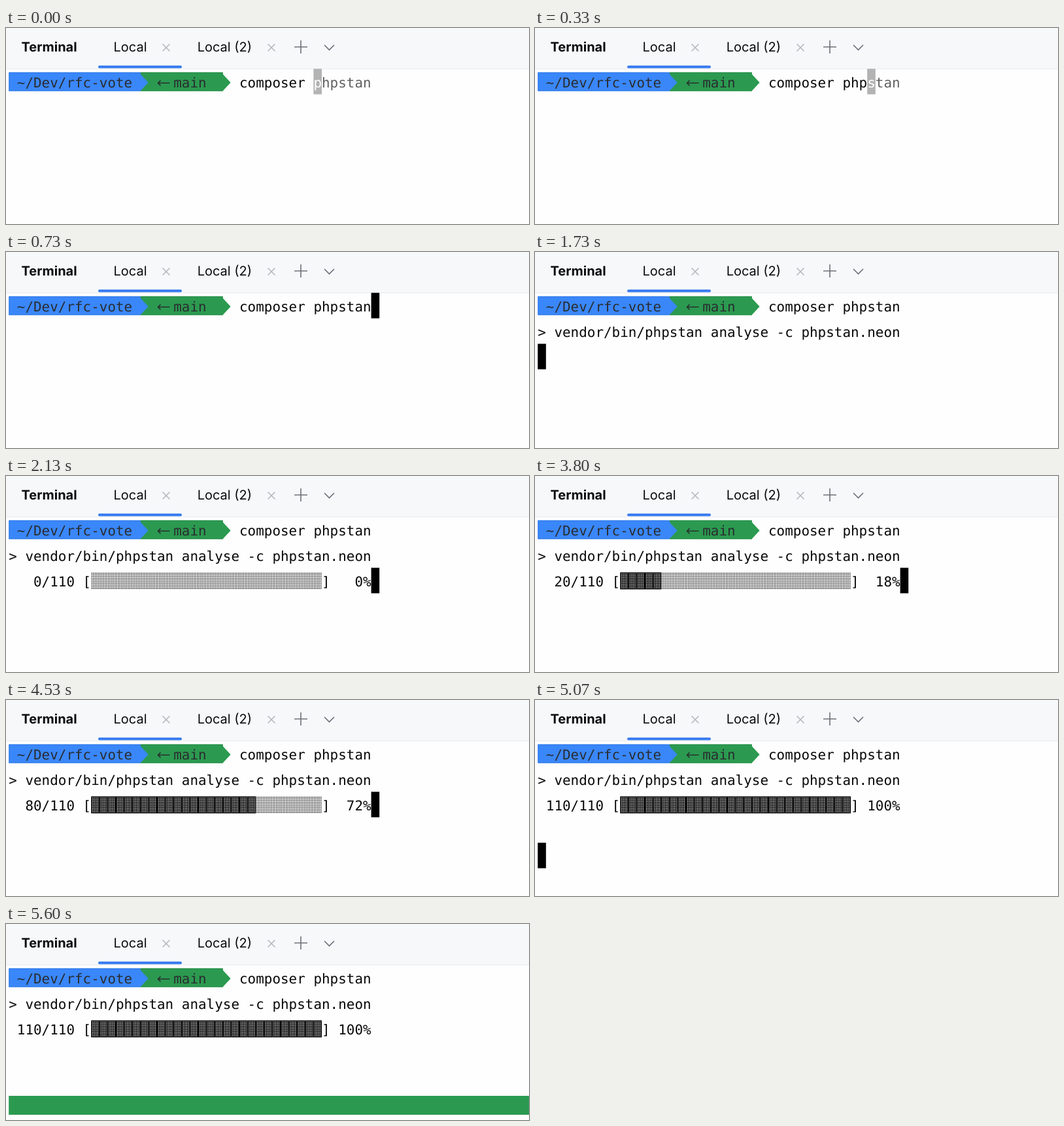
An HTML page with a canvas that plays this animation: 800x300 px, repeating every 6.24 s.

```html
<!DOCTYPE html>
<html lang="en">
<head>
<meta charset="utf-8">
<title>Terminal</title>
<style>
  html, body { margin: 0; width: 100%; height: 100%; overflow: hidden; background: #fefefe; }
  canvas { display: block; width: 800px; height: 300px; }
</style>
</head>
<body>
<canvas id="stage" width="800" height="300"></canvas>
<script>
const ctx = document.getElementById('stage').getContext('2d');
ctx.textRendering = 'geometricPrecision';

const LOOP = 6240;
const CELL = 12.6, LINE = 39, LEFT = 4.2, TOP = 62.5;
const MONO = '20.9px "DejaVu Sans Mono", monospace';
const BLACK = '#080808', PROMPT = '#2a2d2f';
const BLUE = '#3a87fa', BLUE_EDGE = '#2b78e8';
const GREEN = '#2b9a50', GREEN_EDGE = '#1f8c44';
const WORD = 'phpstan', WORD_COL = 37;
const BAR_CELLS = 28, BAR_COL = 10, TOTAL = 110;

// [time, files done]
const PROGRESS = [[1800, 0], [3600, 20], [4270, 40], [4400, 60], [4530, 80], [4800, 90], [5070, 110]];

const colX = col => LEFT + col * CELL;
const rowY = row => TOP + row * LINE;

function rect(x, y, w, h, color) {
  ctx.fillStyle = color;
  ctx.fillRect(x, y, w, h);
}

function shape(points, color) {
  ctx.fillStyle = color;
  ctx.beginPath();
  points.forEach(([x, y]) => ctx.lineTo(x, y));
  ctx.fill();
}

function stroke(color, width, ...lines) {
  ctx.strokeStyle = color;
  ctx.lineWidth = width;
  ctx.beginPath();
  for (const line of lines) {
    line.forEach(([x, y], i) => i ? ctx.lineTo(x, y) : ctx.moveTo(x, y));
  }
  ctx.stroke();
}

function label(text, x, weight) {
  ctx.font = `${weight} 20px Inter, sans-serif`;
  ctx.fillStyle = '#0b0b0d';
  ctx.fillText(text, x, 36);
}

// Terminal text sits on a fixed character grid.
function type(text, col, row, color = BLACK) {
  ctx.font = MONO;
  ctx.fillStyle = color;
  [...text].forEach((ch, i) => ctx.fillText(ch, colX(col + i), rowY(row) + 28.5));
}

function cursor(col, row, color = '#000') {
  rect(colX(col), rowY(row), CELL, LINE, color);
}

function closeIcon(x, y) {
  const r = 5.5;
  stroke('#b4b6bb', 1.5, [[x - r, y - r], [x + r, y + r]], [[x + r, y - r], [x - r, y + r]]);
}

function drawHeader() {
  rect(0, 0, 800, 62, '#f7f8fa');
  rect(0, 62, 800, 1, '#e9eaee');
  ctx.fillStyle = '#357af0';
  ctx.beginPath();
  ctx.roundRect(141, 57.4, 128, 4.2, 2);
  ctx.fill();
  label('Terminal', 23.5, 700);
  label('Local', 164.5, 400);
  label('Local (2)', 292.7, 400);
  closeIcon(245, 30);
  closeIcon(406, 30);
  stroke('#6c707a', 1.6, [[441, 29], [461, 29]], [[451, 19], [451, 39]]);
  stroke('#6c707a', 1.6, [[487, 26], [494.5, 33.5], [502, 26]]);
}

function segment(from, to, color, edge) {
  const x = colX(from), end = colX(to), top = 67.7, bottom = 96.7;
  rect(x, top, end - x, bottom - top, edge);
  rect(x + 1.3, top + 1.3, end - x - 1.3, bottom - top - 2.6, color);
  shape([[end - 0.5, top + 2.5], [end + 11.8, 83.5], [end - 0.5, bottom]], color);
}

function drawPrompt() {
  segment(16, 26, GREEN, GREEN_EDGE);
  segment(0, 16, BLUE, BLUE_EDGE);
  type('~/Dev/rfc-vote', 1, 0, PROMPT);
  stroke(PROMPT, 1.6, [[232.5, 84.3], [250.5, 84.3]], [[236.5, 80.3], [232.5, 84.3], [236.5, 88.3]]);
  type('main', 20, 0, PROMPT);
  type('composer', 28, 0);
}

function drawWord(t) {
  const typed = t < 70 ? 0 : Math.min(WORD.length, Math.floor((t - 70) / 110) + 1);
  const col = WORD_COL + typed;
  type(WORD.slice(0, typed), WORD_COL, 0);
  if (typed < WORD.length) {
    cursor(col, 0, '#b3b3b3');
    type(WORD[typed], col, 0, '#fff');
    type(WORD.slice(typed + 1), col + 1, 0, '#606060');
  } else if (t < 870) {
    cursor(col, 0);
  }
}

// Light cells carry dark dots; filled cells carry white dots inside a dark rim.
function drawShade(filled) {
  const y = 147.5, height = 26, cols = 5, rows = 10;
  const px = CELL / cols, py = height / rows;
  const dot = (x, y, size, color) => rect(x - size / 2, y - size / 2, size, size, color);
  for (let cell = 0; cell < BAR_CELLS; cell++) {
    const x = colX(BAR_COL + cell);
    const dark = cell < filled;
    if (dark) rect(x, y, CELL, height, '#0c0c0c');
    for (let i = dark ? 1 : 0.5; i < cols; i++) {
      for (let j = dark ? 1 : 0.5; j < rows; j++) {
        dot(x + i * px, y + j * py, dark ? 1.3 : 1.45, dark ? '#fff' : '#111');
      }
    }
  }
}

function drawProgress(t) {
  const done = PROGRESS.filter(([start]) => t >= start).pop()[1];
  const ratio = done / TOTAL;
  type(`${String(done).padStart(3)}/${TOTAL} [`, 1, 2);
  drawShade(Math.floor(ratio * BAR_CELLS));
  type(`] ${String(Math.floor(ratio * 100)).padStart(3)}%`, BAR_COL + BAR_CELLS, 2);
}

function drawOutputCursor(t) {
  const blinkedOff = (t >= 2270 && t < 2870) || (t >= 3400 && t < 3600);
  if (t < 870 || t >= 5270 || blinkedOff) return;
  if (t < 1200) cursor(0, 1);
  else if (t < 1800) cursor(0, 2);
  else if (t < 5070) cursor(44, 2);
  else cursor(0, 4);
}

function draw(t) {
  rect(0, 0, 800, 300, '#fefefe');
  drawHeader();
  drawPrompt();
  drawWord(t);
  if (t >= 1200) type('> vendor/bin/phpstan analyse -c phpstan.neon', 0, 1);
  if (t >= 1800) drawProgress(t);
  drawOutputCursor(t);
  if (t >= 5270) rect(LEFT, 263, 800 - LEFT, 29, GREEN);
}

const start = performance.now();
function frame() {
  draw((performance.now() - start) % LOOP);
  requestAnimationFrame(frame);
}
frame();
</script>
</body>
</html>
```
